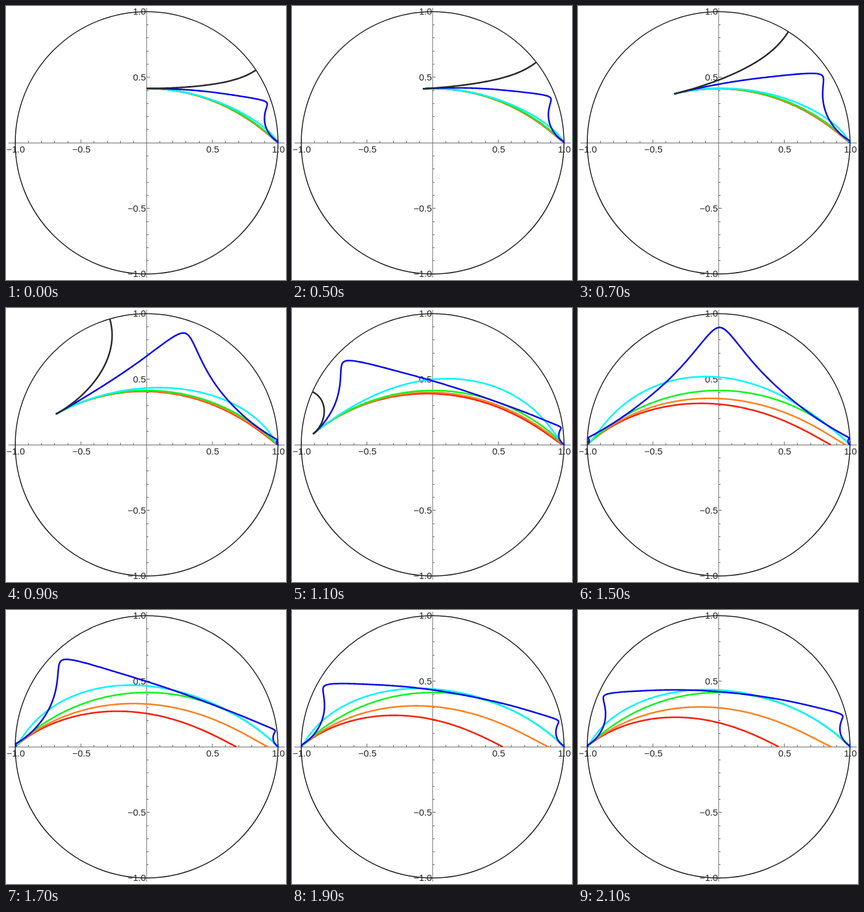
Recreate the animation shown at these times as an HTML page. Size 454 by 445 pixels, loop 2600 ms.

```html
<!DOCTYPE html>
<html lang="en">
<head>
<meta charset="utf-8">
<title>Curves in the hyperbolic disk</title>
<style>
  html, body { margin: 0; width: 100%; height: 100%; overflow: hidden; background: #fff; }
  svg { display: block; width: 454px; height: 445px; }
  text { font: 15px "Liberation Sans", Arial, sans-serif; fill: #222; }
  path, circle { fill: none; }
  #axes { stroke: #666; stroke-width: 1; }
  #disk { stroke: #1c1c1c; stroke-width: 1.5; }
  #curves path { stroke-width: 2.6; stroke-linejoin: round; }
</style>
</head>
<body>
<svg viewBox="0 0 454 445">
  <path id="axes"/>
  <g id="labels"></g>
  <circle id="disk" cx="228" cy="222.2" r="213"/>
  <g id="curves"></g>
</svg>
<script>
const CX = 228, CY = 222.2, R = 213, Q = Math.PI / 4;
const { sin, cos, sinh, cosh, sqrt, hypot, exp, floor, min, max } = Math;
const $ = id => document.getElementById(id);

function add(parent, tag, attrs, text) {
  const el = document.createElementNS("http://www.w3.org/2000/svg", tag);
  for (const key in attrs) el.setAttribute(key, attrs[key]);
  if (text) el.textContent = text;
  return parent.appendChild(el);
}

function drawAxes() {
  let d = `M4 222.5H452M${CX} 3V441`;
  for (let i = -10; i <= 10; i++) {
    if (!i) continue;
    const len = i % 5 ? 3 : 5;
    const x = floor(CX + i * R / 10) + 0.5, y = floor(CY - i * R / 10) + 0.5;
    d += `M${x} 222v${-len}M${CX} ${y}h${len}`;
  }
  $("axes").setAttribute("d", d);
  for (const v of [-1, -0.5, 0.5, 1]) {
    const label = v.toFixed(1).replace("-", "\u2212");
    add($("labels"), "text", { x: CX + v * R + 0.7, y: 238, "text-anchor": "middle" }, label);
    add($("labels"), "text", { x: 226.8, y: CY - v * R + 5, "text-anchor": "end" }, label);
  }
}

// Curves live in the band model: s runs along the axis, phi is the height (0 to pi/2).
function sample(phi, length = 18) {
  const n = Math.ceil(length / 0.02);
  return Array.from({ length: n + 1 }, (_, i) => [i / n * length, phi(i / n * length)]);
}

// Sinks slowly, then bends down to the axis at s = length.
function falling(length, a) {
  return sample(s => {
    const x = s / length;
    return Q * (1 - a * x ** 2 - (1 - a) * x ** 8);
  }, length);
}

// Periodic wave with narrow rounded crests.
function peaked(s, half = 1.82, round = 0.07) {
  const fromCrest = s % (2 * half) - half;
  const u = half - hypot(fromCrest, round);
  return Q + 0.15 * u ** 2 + 0.0075 * u ** 6;
}

// Quarter ellipse that meets the boundary at a right angle.
function escaping(length) {
  return sample(a => a, Math.PI / 2).map(([a]) => [length * sin(a), 2 * Q - Q * cos(a)]);
}

const curves = [
  ["#fa1e05", falling(8, 0.45)],
  ["#ff8020", falling(9.58, 0.4)],
  ["#0cf61c", sample(() => Q)],
  ["#00f6fc", sample(s => Q + 0.227 * Math.abs(sin(Math.PI * s / 8.5)) ** 3)],
  ["#0808f0", sample(s => peaked(s))],
  ["#2a2a2e", escaping(1.195)]
].map(([stroke, pts]) => ({ pts, el: add($("curves"), "path", { stroke }) }));

// Map the band to the disk after sliding it left along the axis.
function project(pts, shift) {
  return "M" + pts.map(([s, phi]) => {
    const u = s - shift, w = cosh(u) + cos(phi);
    return (CX + R * sinh(u) / w).toFixed(2) + " " + (CY - R * sin(phi) / w).toFixed(2);
  }).join("L");
}

// The slide speeds up and slows down along a bell curve.
function shiftAt(step) {
  let shift = 0;
  for (let i = 0; i < step; i++) shift += 0.722 * exp(-0.031 * (i - 7.5) ** 2);
  return shift;
}

let shown = -1;
function frame() {
  const t = performance.now() % 2600;
  const step = max(0, min(17, floor((t - 500) / 100) + 1));
  if (step !== shown) {
    shown = step;
    const shift = shiftAt(step);
    for (const c of curves) c.el.setAttribute("d", project(c.pts, shift));
  }
  requestAnimationFrame(frame);
}

drawAxes();
frame();
</script>
</body>
</html>
```
